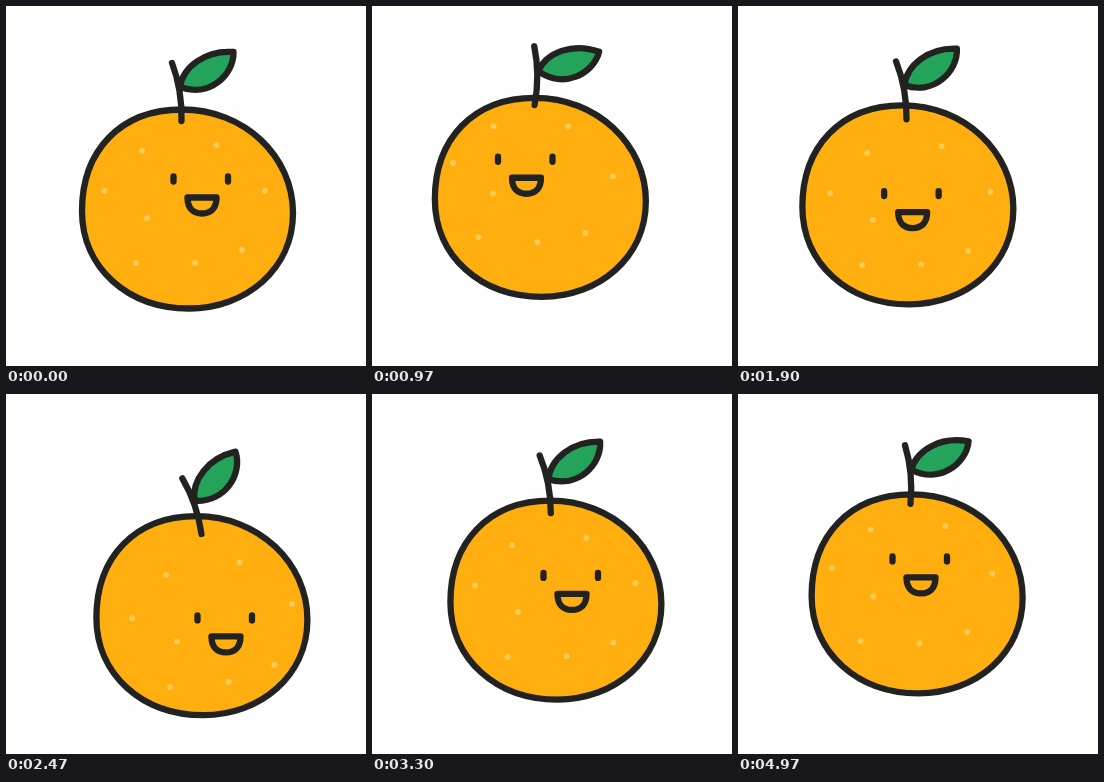
Animation of 360 by 360 pixels, one loop 5070 ms. Source, as an HTML page:

```html
<!DOCTYPE html>
<html lang="en">
<head>
<meta charset="utf-8">
<title>Nodding orange</title>
<style>
  html, body { margin: 0; height: 100%; overflow: hidden; background: #fefefe; }
  svg { display: block; width: 100vw; height: 100vh; }
  .line { stroke: #222220; stroke-width: 6.3; stroke-linecap: round; stroke-linejoin: round; }
</style>
</head>
<body>
<svg viewBox="0 0 360 360" fill="none">
  <path id="body" class="line" fill="#ffae10"
    d="M76 205C76 145 114 103.500 176 103.500C238 103.500 287 150 287 207C287 263 240 302.500 183 302.500C122 302.500 76 262 76 205Z"/>
  <g id="dots" fill="#f7ca54"></g>
  <g id="face" class="line">
    <path d="M167.500 170.500v5M222 170.500v5"/>
    <path d="M181.500 191.500H210.500C210.500 202 205 207.500 196 207.500S181.500 202 181.500 191.500Z"/>
  </g>
  <g id="stem" class="line">
    <path id="leaf" fill="#24a35a" d="M174 81C177 61 199 44 227.500 46C228 69 203 92 174 81Z"/>
    <path d="M175.500 115C176 95 174 78 166 57"/>
  </g>
</svg>
<script>
const LOOP = 5070, REPEAT = 4430, FPS = 30;
const SIDE_LAG = 75; // sideways motion trails the vertical one
const $ = id => document.getElementById(id);

const spots = [[136, 145], [210.5, 139], [98.5, 185], [259, 185],
  [141, 212], [236, 244], [130, 257], [189, 257]];
$("dots").innerHTML = spots.map(([x, y]) => `<circle cx="${x}" cy="${y}" r="3"/>`).join("");

// Offsets when looking up left and down right; the heavier parts follow later.
// The whole turn also rotates each part by a share of the angle, about its pivot.
const TURN_UP = 16, TURN_DOWN = -17;
const parts = {
  face: { up: [-46, -20.5], down: [24, 51], lag: 25, share: 0, pivot: [0, 0] },
  dots: { up: [-22, -23], down: [29, 32.5], lag: 50, share: 0.3, pivot: [175, 203] },
  stem: { up: [-15.5, -17.5], down: [20, 25], lag: 90, share: 0.57, pivot: [175.5, 115] },
  body: { up: [-17, -13.5], down: [14.5, 18.7], lag: 135, share: 0, pivot: [0, 0] },
  leaf: { up: [0, 0], down: [0, 0], lag: 0, share: 0.43, pivot: [175, 79] }
};

function ease(t, start, length) {
  const u = Math.min(Math.max((t - start) / length, 0), 1);
  return u * u * (3 - 2 * u);
}

// Rest, look up, swing down, settle back to rest
function swing(t, up, down, lag = 0) {
  const rise = ease(t - lag, 100, 950);
  const fall = ease(t - lag, 1480, 800);
  const settle = ease(t, 2440, 1160);
  return up * rise * (1 - fall) + down * fall * (1 - settle);
}

function draw(now) {
  let t = now % LOOP;
  if (t >= REPEAT + 100) t -= REPEAT;
  t = Math.floor(t * FPS / 1000 + 0.05) * 1000 / FPS;
  const turn = swing(t, TURN_UP, TURN_DOWN);
  for (const [id, { up, down, lag, share, pivot }] of Object.entries(parts)) {
    const x = swing(t, up[0], down[0], lag + SIDE_LAG);
    const y = swing(t, up[1], down[1], lag);
    $(id).setAttribute("transform", `translate(${x} ${y}) rotate(${turn * share} ${pivot})`);
  }
  requestAnimationFrame(draw);
}
draw(performance.now());
</script>
</body>
</html>
```
